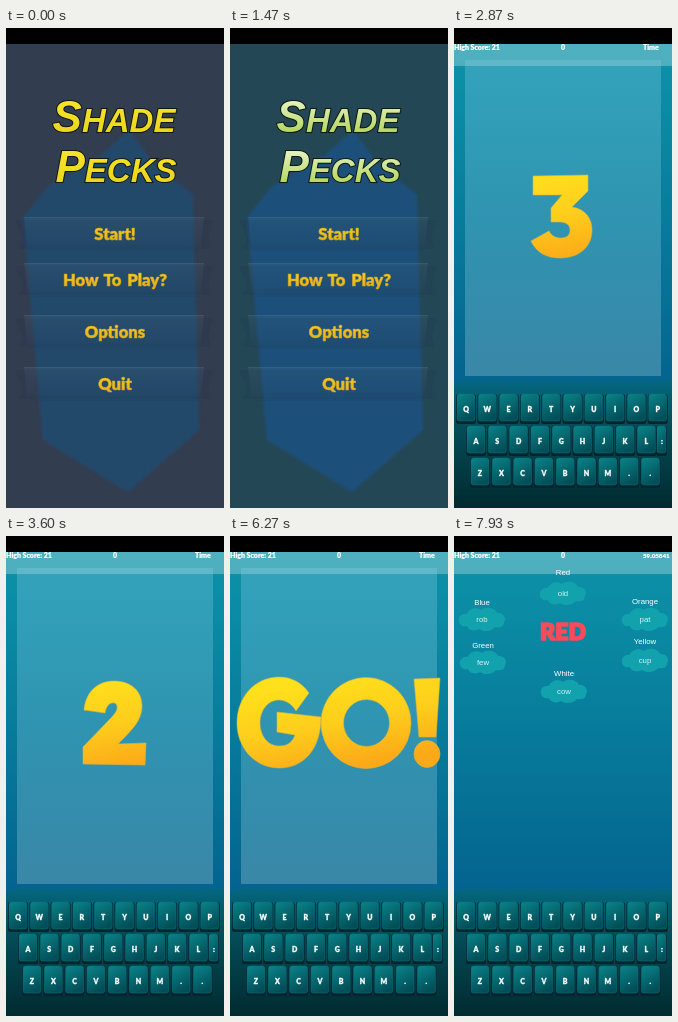
An HTML page for the animation above (8 s loop, 218 by 480 pixels).

```html
<!DOCTYPE html>
<html lang="en">
<head>
<meta charset="utf-8">
<title>Typing game</title>
<style>
html, body { margin: 0; width: 100%; height: 100%; overflow: hidden; background: #000; }
svg { display: block; width: 100vw; height: 100vh; }
text { text-anchor: middle; }
.fun { font-family: Lato, sans-serif; font-weight: 900; stroke-linejoin: round; }
.item { font-size: 16.6px; word-spacing: 2px; fill: url(#gold); stroke: #d0a51e; stroke-width: .6; }
.title { font-family: "Liberation Sans", Arial, sans-serif; font-weight: 700; font-style: italic; font-size: 33px;
  fill: url(#name); stroke: #10180f; stroke-width: 2; paint-order: stroke; }
.title .cap { font-size: 44px; }
.head { font-size: 7px; fill: #fff; stroke: #fff; stroke-width: .2; }
.key { font-size: 7px; fill: #fff; stroke: #fff; stroke-width: .3; }
.label { font-family: "Liberation Sans", Arial, sans-serif; font-size: 7.8px; fill: #fff; }
.word { fill: #d5f4f2; }
</style>
</head>
<body>
<svg viewBox="0 0 218 480" preserveAspectRatio="none">
  <defs>
    <linearGradient id="gold" x2="0" y2="1"><stop stop-color="#f0d62a"/><stop offset="1" stop-color="#e6a918"/></linearGradient>
    <linearGradient id="count" gradientUnits="userSpaceOnUse" x1="95" y1="142" x2="112" y2="232">
      <stop stop-color="#ffe01c"/><stop offset=".5" stop-color="#fdce1c"/><stop offset="1" stop-color="#fca918"/></linearGradient>
    <linearGradient id="name" x2="0" y2="1"><stop id="nameTop"/><stop id="nameEnd" offset="1"/></linearGradient>
    <linearGradient id="plank" x2="0" y2="1"><stop stop-color="#7fa3b4" stop-opacity=".1"/>
      <stop offset=".6" stop-color="#56809a" stop-opacity=".07"/><stop offset="1" stop-color="#1a3448" stop-opacity=".14"/></linearGradient>
    <linearGradient id="sea" x2="0" y2="1"><stop stop-color="#0d93a8"/><stop offset=".45" stop-color="#087f9d"/><stop offset="1" stop-color="#04648f"/></linearGradient>
    <linearGradient id="pane" x2="0" y2="1"><stop stop-color="#33a3ba"/><stop offset=".5" stop-color="#2f94b1"/><stop offset="1" stop-color="#3a87a8"/></linearGradient>
    <linearGradient id="deep" x2="0" y2="1"><stop stop-color="#046880"/><stop offset=".3" stop-color="#03505c"/><stop offset="1" stop-color="#012a30"/></linearGradient>
    <linearGradient id="cap" x2=".4" y2="1"><stop stop-color="#0a8489"/><stop offset="1" stop-color="#034f59"/></linearGradient>
    <filter id="soft"><feGaussianBlur stdDeviation="1.5"/></filter>
    <path id="cloud" d="M-23 2C-24-3-19-6-15-5C-13-11-5-12-1-9C4-13 13-11 15-6C21-7 25-1 22 3C22 8 17 9 13 8C9 13 1 13-3 10C-8 13-14 11-15 7C-19 8-23 6-23 2Z" fill="#12a2ad"/>
  </defs>
  <g id="menu">
    <rect id="wall" y="15" width="218" height="465"/>
    <path id="gem" filter="url(#soft)" d="M123 102L148 136L187 167L193 402L122 464L37 412L17 190L42 158L94 128Z"/>
    <g class="title">
      <text x="108" y="104"><tspan class="cap">S</tspan>HADE</text>
      <text x="110" y="154"><tspan class="cap">P</tspan>ECKS</text>
    </g>
    <g id="items"></g>
  </g>
  <g id="game">
    <rect y="15" width="218" height="340" fill="url(#sea)"/>
    <path id="wave" fill="url(#deep)"/>
    <g id="keys"></g>
    <rect y="15" width="218" height="23" fill="#fff" fill-opacity=".27"/>
    <g id="counter">
      <rect x="11" y="32" width="196" height="316" fill="url(#pane)"/>
      <rect x="11" y="32" width="196" height="6" fill="#fff" fill-opacity=".22"/>
      <path id="digit" fill="url(#count)" fill-rule="evenodd" stroke="#d8b441" stroke-width=".6"/>
    </g>
    <g id="round">
      <g id="clouds"></g>
      <text class="fun" x="109" y="104" font-size="23" fill="#fb4a58" stroke="#fb4a58" stroke-width="1.6">RED</text>
    </g>
    <g class="fun head">
      <text x="0" y="22" style="text-anchor:start">High Score: 21</text>
      <text x="109" y="22">0</text>
      <text id="clock" x="189" y="22" style="text-anchor:start"></text>
    </g>
  </g>
  <rect width="218" height="16" fill="#000"/>
</svg>
<script>
const LOOP = 8000, GAME = 2500, PLAY = 6990;
const $ = id => document.getElementById(id);

// Menu colours: time, wall, gem, title top, title bottom
const tints = [
  [0, [51, 61, 80], [35, 72, 106], [250, 232, 45], [232, 210, 28]],
  [800, [36, 65, 88], [29, 70, 128], [244, 250, 222], [166, 205, 62]],
  [2330, [37, 78, 83], [30, 90, 115], [240, 249, 220], [166, 210, 75]]
];

const ring = (cx, cy, rx, ry) =>
  `M${cx - rx} ${cy}a${rx} ${ry} 0 1 1 ${2 * rx} 0a${rx} ${ry} 0 1 1 ${-2 * rx} 0Z`;

// Countdown lettering: start time and outline
const counts = [
  [2500, "M79 148L134 147V163L118 179C132 181 138 191 138 202C138 219 125 230 106 230C92 230 82 224 77 213L95 203C98 209 103 210 107 210C113 210 116 207 116 202C116 196 111 194 105 194H97V180L108 167H79Z"],
  [3350, "M78 174C80 155 92 145 108 145C125 145 136 155 136 170C136 184 127 193 112 208L140 207L139 229L77 228V211L103 184C109 178 112 174 111 170C110 165 101 165 99 177Z"],
  [4470, "M89 148L128 146V227H104V169L90 170Z"],
  [5600, "M79 157L66 175C62 168 56 164 49 164C38 164 30 174 30 187C30 200 38 210 49 210C57 210 62 207 65 199L47 196V176L91 181C91 213 74 232 49 232C25 232 7 212 7 187C7 161 25 141 49 141C62 141 72 147 79 157Z"
    + ring(136, 187, 45, 45.5) + ring(136.5, 187, 23, 23.5)
    + "M184 143L210 142L206 201H189Z" + ring(197, 218, 13, 13.5)]
];

function buildMenu() {
  const rows = [["Start!", 206], ["How To Play?", 252], ["Options", 304], ["Quit", 356]];
  $("items").innerHTML = rows.map(([name, y]) => `
    <path d="M9 ${y - 14}H207L202 ${y + 4}L205 ${y + 15}H13L17 ${y + 4}Z" fill="#0d2433" fill-opacity=".08"/>
    <path d="M18 ${y - 17}H198L194 ${y + 17}H22Z" fill="url(#plank)"/>
    <path d="M18 ${y - 16.5}H198" stroke="#9ab9c4" stroke-opacity=".09"/>
    <text class="fun item" x="109" y="${y + 6}">${name}</text>`).join("");
}

function buildKeys() {
  const rows = [["QWERTYUIOP", 12, 366], ["ASDFGHJKL:", 22, 398], ["ZXCVBNM..", 26, 430]];
  $("keys").innerHTML = rows.map(([chars, x0, y]) => [...chars].map((c, i) => {
    const x = x0 + i * 21.3, w = c === ":" ? 9 : 18;
    const left = c === ":" ? 203 : x - 9;
    const mid = c === ":" ? 208 : x;
    return `<rect x="${left - 1}" y="${y}" width="${w + 2}" height="30" rx="2.5" fill="#01252d"/>
      <rect x="${left}" y="${y}" width="${w}" height="27" rx="2.5" fill="url(#cap)" stroke="#0b737c" stroke-width=".5"/>
      <text class="fun key" x="${mid}" y="${y + 17.5}">${c}</text>`;
  }).join("")).join("");
}

function buildRound() {
  const words = [
    ["Red", "old", 109, 57, 39], ["Blue", "rob", 28, 83, 69], ["Orange", "pat", 191, 83, 68],
    ["Green", "few", 29, 126, 112], ["Yellow", "cup", 191, 124, 108], ["White", "cow", 110, 155, 140]
  ];
  $("clouds").innerHTML = words.map(([name, word, x, y, top]) => `
    <use href="#cloud" x="${x}" y="${y}"/>
    <text class="label" x="${x}" y="${top}">${name}</text>
    <text class="label word" x="${x}" y="${y + 3}">${word}</text>`).join("");
}

function buildWave() {
  let d = "M0 352";
  for (let x = 0; x < 218; x += 12) d += `q6 ${x % 24 ? 3 : 5} 12 0`;
  $("wave").setAttribute("d", d + "V480H0Z");
}

function tint(t, k) {
  const i = t < tints[1][0] ? 0 : 1;
  const a = tints[i], b = tints[i + 1];
  const p = Math.min(1, (t - a[0]) / (b[0] - a[0]));
  return `rgb(${a[k].map((v, n) => Math.round(v + (b[k][n] - v) * p))})`;
}

function timeLeft(t) {
  const step = 1000 / 15;
  const q = Math.floor((t + 5) / step) * step;
  return (59.05841 + (119 * step - q) / 1000).toFixed(5);
}

const show = (id, on) => $(id).setAttribute("display", on ? "inline" : "none");

function draw(t) {
  const playing = t >= PLAY;
  show("menu", t < GAME);
  show("game", t >= GAME);
  if (t < GAME) {
    $("wall").setAttribute("fill", tint(t, 1));
    $("gem").setAttribute("fill", tint(t, 2));
    $("nameTop").setAttribute("stop-color", tint(t, 3));
    $("nameEnd").setAttribute("stop-color", tint(t, 4));
    return;
  }
  show("counter", !playing);
  show("round", playing);
  $("clock").textContent = playing ? timeLeft(t) : "Time";
  $("clock").style.fontSize = playing ? "6.2px" : "7px";
  const now = counts.filter(c => t >= c[0]).pop();
  $("digit").setAttribute("d", now[1]);
}

function tick() {
  draw(performance.now() % LOOP);
  requestAnimationFrame(tick);
}

buildMenu();
buildKeys();
buildRound();
buildWave();
tick();
</script>
</body>
</html>
```
